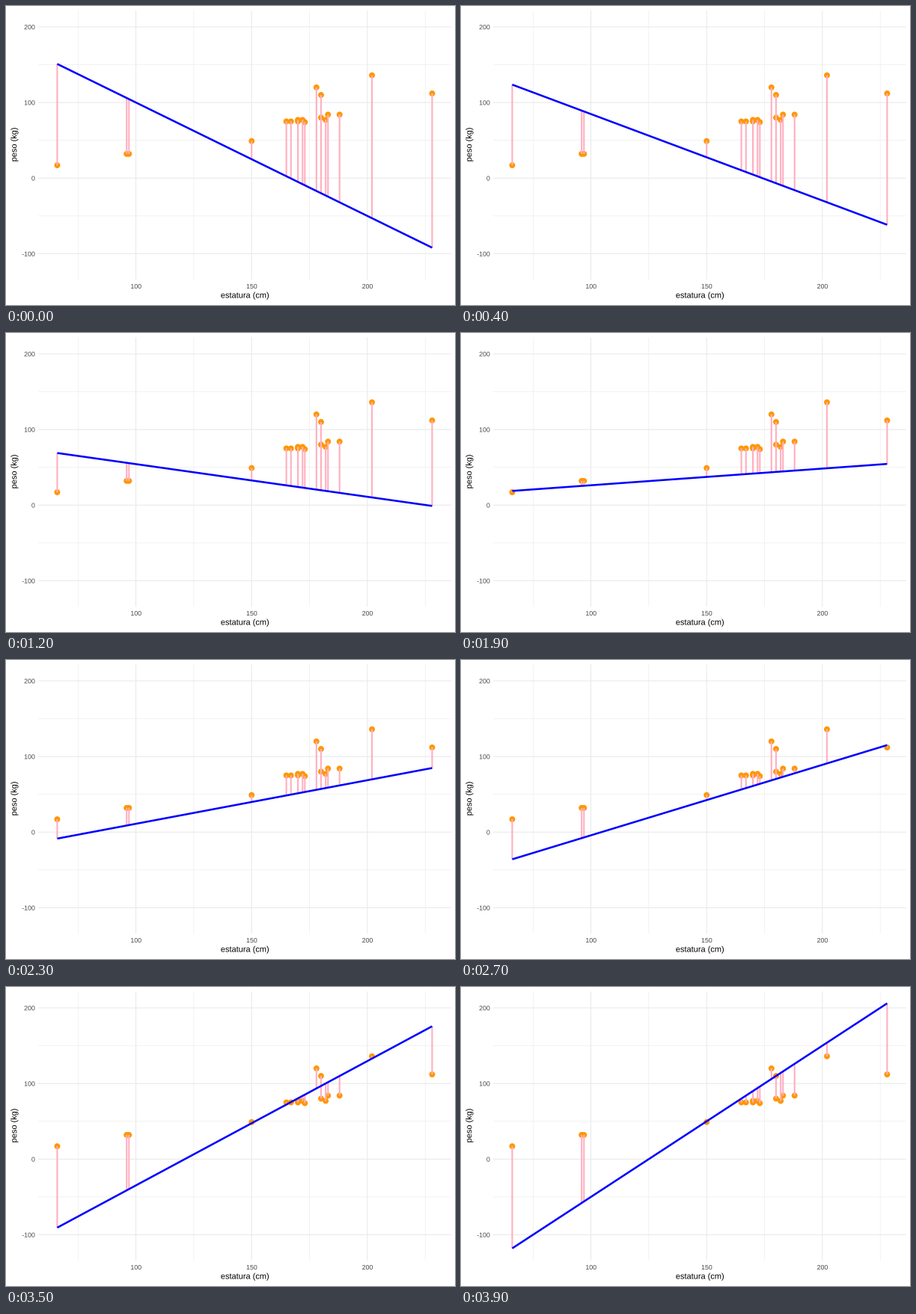
Recreate the animation shown at these times as a matplotlib script. Size 600 by 400 pixels, loop 4000 ms.

```python
import numpy as np
import matplotlib.pyplot as plt
from matplotlib.animation import FuncAnimation
from matplotlib.collections import LineCollection
from matplotlib.patches import Ellipse, PathPatch
from matplotlib.textpath import TextPath
from matplotlib.transforms import Affine2D

plt.rcParams["font.family"] = "Liberation Sans"

W, H, DPI = 600, 400, 100
PX = 72 / DPI  # points per pixel
FRAMES, INTERVAL = 40, 100
LAST_STATE = 59

LEFT, RIGHT, TOP, BOTTOM = 43.4, 594.5, 5.5, 366.0
XLIM, YLIM = (57.9, 236.1), (-134.2, 222.2)
X_SCALE = (RIGHT - LEFT) / (XLIM[1] - XLIM[0])
Y_SCALE = (BOTTOM - TOP) / (YLIM[1] - YLIM[0])

ORANGE, PINK, BLUE = "#ff9600", "#ffb0c0", "#0000ff"
GRID, TICK = "#e9e9e9", "#474747"
DOT = 7.9


def sample():
    """Heights and weights: a few loners plus evenly stepped clusters."""
    people = [(66, 17), (150, 49), (178, 120), (180, 110),
              (188, 84), (202, 136), (228, 112)]
    for k in range(2):
        people += [(96 + k, 32), (170 + 10 * k, 77 + 3 * k),
                   (172 + 10 * k, 77), (173 + 10 * k, 74 + 10 * k)]
    people += [(165 + k * (k + 3) // 2, 75) for k in range(3)]
    return np.array(people).T


def px_x(x):
    return LEFT + (x - XLIM[0]) * X_SCALE


def px_y(y):
    return TOP + (YLIM[1] - y) * Y_SCALE


fig = plt.figure(figsize=(W / DPI, H / DPI), dpi=DPI, facecolor="white")
ax = fig.add_axes([LEFT / W, 1 - BOTTOM / H, (RIGHT - LEFT) / W, (BOTTOM - TOP) / H])
ax.set_xlim(XLIM)
ax.set_ylim(YLIM)
ax.axis("off")

# Stage in pixels for lettering, y measured from the top
stage = fig.add_axes([0, 0, 1, 1])
stage.set_xlim(0, W)
stage.set_ylim(H, 0)
stage.axis("off")


def label(x, y, text, size, color, align=0.5, angle=0):
    """Unhinted text on baseline y; align 0.5 centres, 1 ends at x."""
    path = TextPath((0, 0), text, size=size)
    shift = -align * path.get_extents().x1
    place = Affine2D().translate(shift, 0).scale(1, -1).rotate_deg(-angle).translate(x, y)
    stage.add_patch(PathPatch(path.transformed(place), fc=color, lw=0, snap=False))


def grid(xs, ys, width):
    style = dict(color=GRID, lw=width * PX, snap=False, zorder=0)
    for x in xs:
        ax.axvline(x, **style)
    for y in ys:
        ax.axhline(y, **style)


grid(range(75, 226, 50), range(-50, 151, 100), 0.55)
x_ticks, y_ticks = range(100, 201, 50), range(-100, 201, 100)
grid(x_ticks, y_ticks, 1.07)

for x in x_ticks:
    label(px_x(x), 378, str(x), 8.8, TICK)
for y in y_ticks:
    label(38.5, px_y(y) + 3.3, str(y), 8.8, TICK, align=1)
label((LEFT + RIGHT) / 2, 390.5, "estatura (cm)", 11, "black")
label(14.2, (TOP + BOTTOM) / 2, "peso (kg)", 11, "black", angle=90)

height, weight = sample()
for point in zip(height, weight):
    ax.add_patch(Ellipse(point, DOT / X_SCALE, DOT / Y_SCALE, fc=ORANGE,
                         lw=0, snap=False, zorder=2))
residuals = LineCollection([], colors=PINK, linewidths=2.13 * PX, zorder=3)
residuals.set_snap(False)
residuals.set_capstyle("butt")
ax.add_collection(residuals, autolim=False)
fit, = ax.plot([], [], color=BLUE, lw=2.56 * PX, solid_capstyle="butt",
               snap=False, clip_on=False, zorder=4)
ends = np.array([height.min(), height.max()])


def draw(i):
    # 60 candidate lines share 40 frames; the latest one in each frame shows
    t = int(LAST_STATE * (i + 0.5) / (FRAMES - 1)) / LAST_STATE
    slope, intercept = -1.5 + 3.5 * t, 250 - 500 * t
    fit.set_data(ends, intercept + slope * ends)
    predicted = intercept + slope * height
    residuals.set_segments([[(x, y), (x, p)]
                            for x, y, p in zip(height, weight, predicted)])
    return residuals, fit


anim = FuncAnimation(fig, draw, frames=FRAMES, interval=INTERVAL,
                     repeat=True, repeat_delay=0, blit=False)
plt.show()
```
